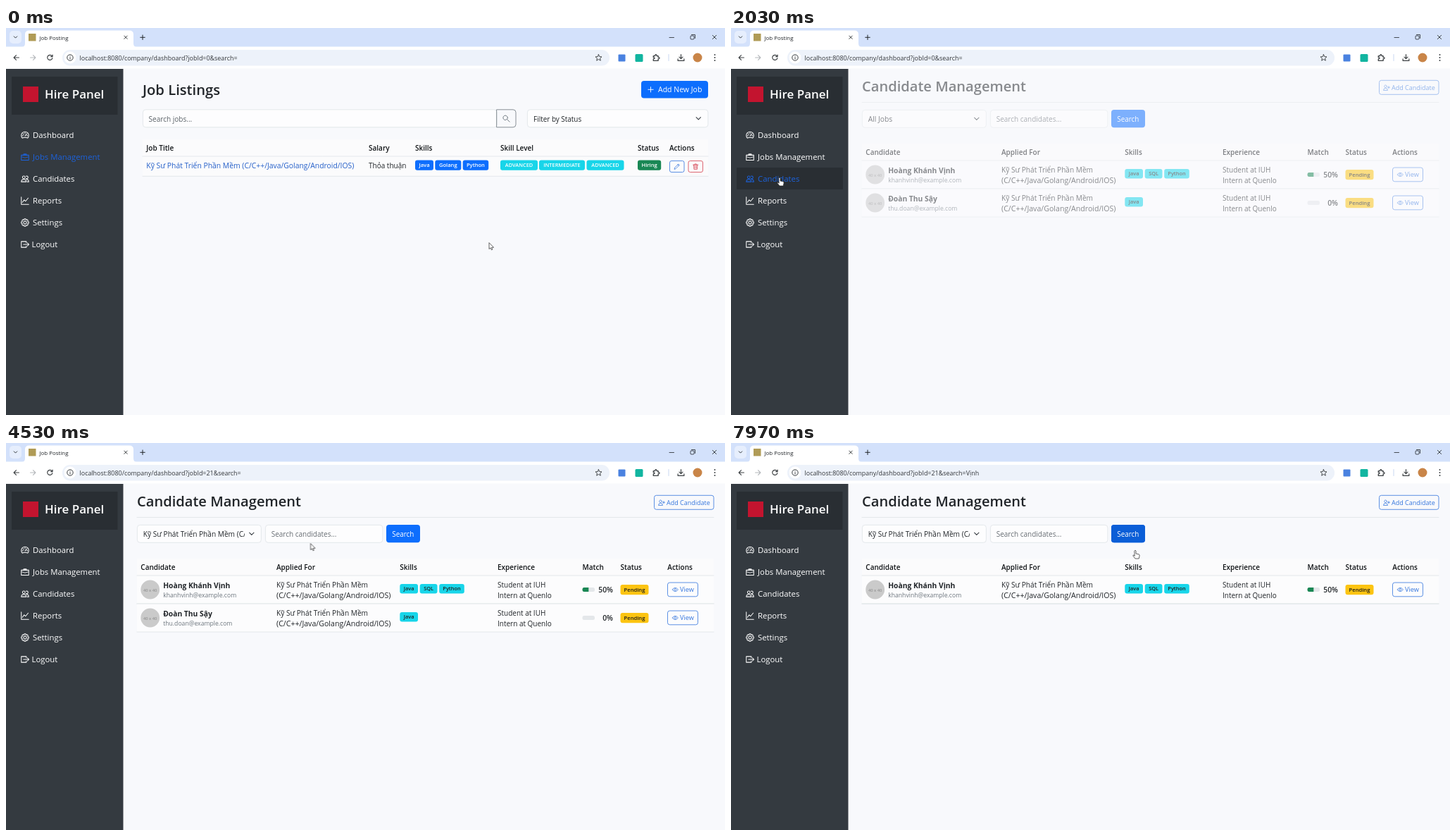
Animation of 1021 by 549 pixels, one loop 8000 ms. Source, as an HTML page:

```html
<!DOCTYPE html>
<html lang="vi">
<head>
<meta charset="utf-8">
<title>Job Posting</title>
<style>
html, body { margin: 0; width: 100%; height: 100%; overflow: hidden; background: #f8f9fc; }
svg { display: block; width: 100vw; height: 100vh; }
text { font-family: "Open Sans", "Noto Sans", sans-serif; white-space: pre; }
#candidatePage { animation: fadeIn 8s linear infinite; }
#cursor { animation: travel 8s ease-in-out infinite; }
@keyframes fadeIn {
  0%, 22.5% { opacity: 0; }
  28%, 100% { opacity: 1; }
}
@keyframes travel {
  0%, 1% { transform: translate(686px, 305px); }
  9.1% { transform: translate(59px, 202px); }
  11.5%, 31% { transform: translate(69px, 212px); }
  38%, 46% { transform: translate(263px, 129.5px); }
  49%, 52.5% { transform: translate(300px, 172px); }
  56.6% { transform: translate(432.5px, 143px); }
  62%, 87% { transform: translate(443.5px, 135.5px); }
  91.5%, 95.5% { transform: translate(565px, 130px); }
  99.6%, 100% { transform: translate(574px, 152px); }
}
</style>
</head>
<body>
<svg id="stage" viewBox="0 0 1021 549" preserveAspectRatio="none"></svg>
<script>
const LOOP = 8000, SWITCH = 1800, FILTER = 4300, TYPE = 5800, BLUR = 7360, RESULT = 7600;
const BLUE = '#0d6efd', DARK = '#212529', SHADE = '#292e33', LINE = '#dee2e6', CYAN = '#18d5e9';
const ACTIVE = '#1c62dc', OUTLINE = '#3475dd', GREEN = '#198754', RED = '#d6404f', GREY = '#6c757d';

// Hard on/off layers: pairs of start and end times in ms.
const rules = [];
function timed(spans, content) {
  const name = 'span' + rules.length;
  const frames = ['0%{opacity:0}'];
  for (let i = 0; i < spans.length; i += 2) {
    frames.push(`${spans[i] / LOOP * 100}%{opacity:1}`, `${spans[i + 1] / LOOP * 100}%{opacity:0}`);
  }
  rules.push(`@keyframes ${name}{${frames.join('')}}.${name}{animation:${name} ${LOOP}ms step-end infinite}`);
  return `<g class="${name}">${content}</g>`;
}

const text = (x, y, value, size = 10, fill = DARK, weight = 400, anchor = 'start') =>
  `<text x="${x}" y="${y}" font-size="${size}" fill="${fill}" font-weight="${weight}" text-anchor="${anchor}">${value}</text>`;
const box = (x, y, w, h, fill, r = 0, stroke = 'none', sw = 0.8) =>
  `<rect x="${x}" y="${y}" width="${w}" height="${h}" rx="${r}" fill="${fill}" stroke="${stroke}" stroke-width="${sw}"/>`;
const circle = (x, y, r, fill, stroke = 'none') =>
  `<circle cx="${x}" cy="${y}" r="${r}" fill="${fill}" stroke="${stroke}"/>`;
const path = (d, stroke, sw = 1, fill = 'none') =>
  `<path d="${d}" fill="${fill}" stroke="${stroke}" stroke-width="${sw}" stroke-linecap="round" stroke-linejoin="round"/>`;
const rule = (x1, x2, y) => path(`M${x1} ${y}H${x2}`, LINE, 0.8);

// Icons live on a 16 unit grid.
const ICONS = {
  gauge: 'M3 13.5A7 7 0 1 1 13 13.5Q8 11 3 13.5M8 9.5L11.5 5.5M8 3.5V5M3 9H4.5M11.5 9H13M4.5 5.5L5.5 6.5',
  case: 'M1 4.5H15V14H1ZM5.5 4.5V2.5H10.5V4.5M1 7.5L8 9.5L15 7.5',
  people: 'M8.2 5A2.5 2.5 0 1 0 8.2 5.1M1 13.5Q1 9 5.7 9T10.4 13.5ZM10 3A2.5 2.5 0 1 1 10 7.4M11 9Q15 9 15 13.5H12.5',
  chart: 'M1 1V15H15M3 11L6.5 6.5L9 9L14 3',
  gear: 'M8 5.2A2.8 2.8 0 1 0 8.1 5.2M6.8 1H9.2L9.8 3L11.8 2.3L13.7 4.2L13 6.2L15 6.8V9.2L13 9.8L13.7 11.8L11.8 13.7L9.8 13L9.2 15H6.8L6.2 13L4.2 13.7L2.3 11.8L3 9.8L1 9.2V6.8L3 6.2L2.3 4.2L4.2 2.3L6.2 3Z',
  exit: 'M10.5 5V2.5H1V13.5H10.5V11M5 8H15.5M12.5 5L15.5 8L12.5 11',
  pencil: 'M2 14L3 10.5L11.5 2L14 4.5L5.5 13ZM10 3.5L12.5 6',
  bin: 'M2 4H14M3.5 4L4.2 14.5H11.8L12.5 4M6 4V2H10V4M6.3 6.5V12M9.7 6.5V12',
  eye: 'M1 8Q8 -1 15 8Q8 17 1 8M8 5.5A2.5 2.5 0 1 0 8.1 5.5',
  addUser: 'M9 5A3 3 0 1 0 9 5.1M1 14Q1 9.5 6 9.5T11 14ZM13.5 5V10M11 7.5H16',
  lens: 'M11 6.5A4.7 4.7 0 1 0 11 6.6M10 10L15 15',
  chevron: 'M2 5L8 11L14 5',
  plus: 'M8 1.5V14.5M1.5 8H14.5',
  cross: 'M3 3L13 13M13 3L3 13',
  back: 'M15 8H2M8 2L2 8L8 14',
  forward: 'M1 8H14M8 2L14 8L8 14',
  reload: 'M13.6 9A6 6 0 1 1 12 3.6L14 5.6M14 1.5V5.6H10',
  star: 'M8 1L10.1 5.8L15.2 6.2L11.3 9.6L12.5 14.7L8 12L3.5 14.7L4.7 9.6L0.8 6.2L5.9 5.8Z',
  puzzle: 'M2 4H6Q5.5 1 7.7 1T9.5 4H13V7.5Q16 7 16 9T13 10.8V15H2V11Q5 10.5 5 9T2 7.5Z',
  download: 'M8 1V10.5M4 6.5L8 10.5L12 6.5M1 11V15H15V11'
};
const icon = (name, cx, cy, size, color, sw = 1.3) =>
  `<g transform="translate(${cx - size / 2} ${cy - size / 2}) scale(${size / 16})">${path(ICONS[name], color, sw)}</g>`;

const badge = (x, y, w, h, label, fill, color, size = 7.6) =>
  box(x, y, w, h, fill, 3) + text(x + w / 2, y + h / 2 + 2.6, label, size, color, 600, 'middle');
const headings = (y, items) => items.map(([x, label]) => text(x, y, label, 10, '#111417', 600)).join('');

function browser() {
  const base = 'localhost:8080/company/dashboard?jobId=';
  const address = (spans, query) => timed(spans, text(104.5, 45.5, base + query, 8.93, '#33363a'));
  return box(0, 0, 1021, 30, '#d3e1fb') + box(5, 4, 17, 18, '#e6eefd', 5) + icon('chevron', 13.5, 13, 6, DARK, 2.4)
    + path('M22 27Q27 27 27 22V9Q27 3.5 33 3.5H175Q181 3.5 181 9V22Q181 27 186 27Z', 'none', 0, '#fff')
    + box(0, 26.5, 1021, 31, '#fff') + box(32, 8, 10.5, 10.5, '#b09b56')
    + text(47.5, 16.5, 'Job Posting', 7.9) + icon('cross', 170, 13.3, 7, DARK, 2) + icon('plus', 194, 13.3, 8, DARK, 2)
    + path('M942 13.5H948.5', DARK, 0.8) + box(972, 11, 5, 5, 'none', 1, DARK)
    + path('M973.5 9.5H978.5V14.5', DARK, 0.8) + icon('cross', 1006, 13, 8.5, DARK, 1.6)
    + icon('back', 14.5, 42, 9, '#3c4043', 2) + icon('forward', 38.5, 42, 9, '#b4b7bb', 2)
    + icon('reload', 62.5, 42, 9.5, '#3c4043', 2)
    + box(80, 31, 777, 22.5, '#edf2fa', 11) + circle(91, 42, 8.5, '#fff')
    + circle(91, 42, 4.2, 'none', '#3c4043') + path('M91 41.7V44M91 39.8V40', '#3c4043', 1)
    + address([0, FILTER], '0&amp;search=') + address([FILTER, RESULT], '21&amp;search=')
    + address([RESULT, LOOP], '21&amp;search=Vịnh')
    + icon('star', 841.5, 42, 10, '#3c4043', 1.5) + box(869.5, 37.5, 10, 10, '#4a82e0', 1)
    + box(893.5, 37, 11, 11, '#12b5a0', 1.5) + icon('puzzle', 923, 42, 10, '#3c4043', 2)
    + path('M941 37.5V46.5', '#c9d8f2', 1) + icon('download', 958.5, 42, 10, '#3c4043', 1.9)
    + circle(982, 42, 6.5, '#c98548')
    + [38, 42, 46].map(y => circle(1006.5, y, 1, '#3c4043')).join('');
}

function sidebar() {
  const item = (name, label, y, color, x = 38) =>
    icon(name, 27, y, 12, color, 1.35) + text(x, y + 4.2, label, 11.35, color);
  const hover = (spans, y) => timed(spans, box(8, y, 151, 31, SHADE, 1));
  const jobs = color => item('case', 'Jobs Management', 183, color);
  const people = color => item('people', 'Candidates', 214, color);
  return box(0, 58, 166.5, 491, '#343a40') + box(8, 69, 150.5, 54, SHADE) + box(24, 83, 22, 22, '#c3142f')
    + text(55, 100.3, 'Hire Panel', 17, '#fff', 600)
    + hover([640, 830], 167) + hover([830, 2640], 198)
    + item('gauge', 'Dashboard', 152, '#fff')
    + timed([0, SWITCH], jobs(ACTIVE)) + timed([SWITCH, LOOP], jobs('#fff'))
    + timed([0, SWITCH, FILTER, LOOP], people('#fff')) + timed([SWITCH, FILTER], people(ACTIVE))
    + item('chart', 'Reports', 245, '#fff') + item('gear', 'Settings', 276, '#fff')
    + item('exit', 'Logout', 307, '#fff', 36.5);
}

const ROLE = 'Kỹ Sư Phát Triển Phần Mềm';
const STACK = '(C/C++/Java/Golang/Android/IOS)';

function jobPage() {
  const skills = [[581, 26, 'Java'], [609.3, 37, 'Golang'], [648.7, 36.5, 'Python']];
  const levels = [[702, 53, 'ADVANCED'], [757, 65, 'INTERMEDIATE'], [824.5, 53, 'ADVANCED']];
  return text(194, 95.3, 'Job Listings', 20.2, DARK, 600)
    + box(902, 75, 95, 24.5, BLUE, 4) + icon('plus', 915.5, 87.3, 9, '#fff', 1.6)
    + text(926, 91.2, 'Add New Job', 10.5, '#fff')
    + box(194.4, 115.8, 503, 25, '#fdfdfe', 4, LINE) + text(202.5, 132.6, 'Search jobs...', 10.05, '#5c6369')
    + path('M697 115.8H720Q724 115.8 724 119.8V136.8Q724 140.8 720 140.8H697Z', GREY, 0.8)
    + icon('lens', 710.3, 128.3, 11, GREY, 1.4)
    + box(740.4, 115.8, 256.5, 25, '#fdfdfe', 4, LINE) + text(749, 132.6, 'Filter by Status', 9.95)
    + icon('chevron', 983.3, 128.3, 8.5, '#343a40', 2)
    + box(194, 158, 803, 52, '#fbfbfc')
    + headings(173.8, [[199.3, 'Job Title'], [515, 'Salary'], [581, 'Skills'], [702, 'Skill Level'], [897, 'Status'], [942, 'Actions']])
    + rule(194, 997, 182) + rule(194, 997, 210.3)
    + text(199.3, 199.4, ROLE + ' ' + STACK, 10.36, '#245fc9') + text(515, 199.4, 'Thỏa thuận', 10)
    + skills.map(([x, w, label]) => badge(x, 187.5, w, 14.3, label, BLUE, '#fff')).join('')
    + levels.map(([x, w, label]) => badge(x, 187.5, w, 14.3, label, CYAN, '#fff', 7.4)).join('')
    + badge(897, 187.5, 33.2, 14.3, 'Hiring', GREEN, '#fff')
    + box(942.5, 188.5, 20.5, 16, 'none', 2.5, OUTLINE) + icon('pencil', 952.7, 196.5, 9.5, OUTLINE)
    + box(969, 188.5, 20.5, 16, 'none', 2.5, RED) + icon('bin', 979.2, 196.5, 9.5, RED);
}

function candidateRow(y, name, mail, skills, match) {
  return box(186, y, 819, 40, '#fcfcfd') + rule(186, 1005, y + 40)
    + circle(204.7, y + 20, 13.4, '#cacaca') + text(204.7, y + 22.6, '40 x 40', 5.8, '#969696', 600, 'middle')
    + text(223.2, y + 18.2, name, 10.3, DARK, 700) + text(223.2, y + 31, mail, 8.65, GREY)
    + text(384, y + 17.4, ROLE, 10.1) + text(384, y + 31.6, STACK, 10.6)
    + skills.map(([x, w, label]) => badge(x, y + 12, w, 13.6, label, CYAN, '#222', 7.4)).join('')
    + text(698, y + 17.4, 'Student at IUH', 10) + text(698, y + 31.6, 'Intern at Quenlo', 10)
    + box(818.5, y + 17, 17.5, 6, '#e4e7ea', 2.5)
    + (match ? path(`M827.3 ${y + 17}V${y + 23}H821Q818.5 ${y + 23} 818.5 ${y + 20}T821 ${y + 17}Z`, 'none', 0, GREEN) : '')
    + text(862, y + 24.4, match + '%', 10.3, DARK, 600, 'end')
    + badge(872.5, y + 13, 40, 14.3, 'Pending', '#fcc412', '#1b1b1b')
    + box(939.5, y + 10, 43, 19.8, 'none', 3, OUTLINE) + icon('eye', 950.3, y + 20, 9.5, OUTLINE)
    + text(957, y + 23.4, 'View', 9.2, OUTLINE);
}

function candidatePage() {
  const typed = ['V', 'Vi', 'Vịn', 'Vịnh'].map((word, i) => {
    const start = TYPE + i * 200;
    return timed([start, i < 3 ? start + 200 : RESULT], text(376.7, 133, word, 10));
  }).join('');
  const searchButton = fill => box(540, 116, 48, 25.3, fill, 4);
  const java = [559.3, 25.7, 'Java'];
  return text(186, 90, 'Candidate Management', 20.1, DARK, 600)
    + box(920.5, 74.3, 84.5, 20, 'none', 3, OUTLINE) + icon('addUser', 930.7, 84.5, 9.5, OUTLINE)
    + text(938, 87.9, 'Add Candidate', 9, OUTLINE) + rule(186, 1005, 105.5)
    + box(186.4, 116.3, 176, 25, '#fdfdfe', 4, LINE) + icon('chevron', 348.8, 128.8, 8.5, '#343a40', 2)
    + timed([0, FILTER], text(194.7, 133, 'All Jobs', 10.3))
    + timed([FILTER, LOOP], `<g clip-path="url(#selectText)">${text(194.7, 133, ROLE + ' ' + STACK, 10.15)}</g>`)
    + box(368.4, 116.3, 166.5, 25, '#fdfdfe', 4, LINE)
    + timed([5300, BLUR], box(367.4, 115.3, 168.5, 27, 'none', 5, '#bcd6fd', 2.4) + box(368.4, 116.3, 166.5, 25, '#fff', 4, '#6ba4f8', 1))
    + timed([0, TYPE, RESULT, LOOP], text(376.7, 133, 'Search candidates...', 10, '#686e74')) + typed
    + searchButton(BLUE) + timed([7180, LOOP], searchButton('#0b5ed7')) + text(548.3, 133, 'Search', 9.9, '#fff')
    + box(186, 164, 819, 24, '#fbfbfc')
    + headings(179.8, [[191.3, 'Candidate'], [384, 'Applied For'], [559.3, 'Skills'], [698, 'Experience'], [818.5, 'Match'], [872.5, 'Status'], [939.3, 'Actions']])
    + candidateRow(188, 'Hoàng Khánh Vịnh', 'khanhvinh@example.com', [java, [587.7, 24.8, 'SQL'], [615.2, 35.6, 'Python']], 50)
    + timed([0, RESULT], candidateRow(228, 'Đoàn Thu Sậy', 'thu.doan@example.com', [java], 0))
    + rule(186, 1005, 188) + rule(186, 1005, 228);
}

function cursor() {
  const arrow = path('M0 0V8.6L2 6.8L3.4 9.8L4.8 9.2L3.5 6.3H6.2Z', '#222', 0.7, '#fff');
  const hand = path('M-1 1Q0 -1 1 1V5L5 5.8Q6.4 6.2 6.1 8L5.2 12H0L-3 8.2Q-3.4 6.8 -2.2 7L-1 8Z', '#222', 0.7, '#fff');
  const beam = path('M-2 -4.5H-0.6L0 -4L0.6 -4.5H2M0 -4V4M-2 4.5H-0.6L0 4L0.6 4.5H2', '#222', 0.9);
  return timed([0, 620, 2640, 4680], arrow) + timed([620, 2640, 7150, LOOP], hand) + timed([4680, 7150], beam);
}

document.getElementById('stage').innerHTML =
  '<clipPath id="selectText"><rect x="190" y="116" width="148.5" height="26"/></clipPath>'
  + box(0, 0, 1021, 549, '#f8f9fc') + browser() + sidebar()
  + timed([0, SWITCH], jobPage()) + `<g id="candidatePage">${candidatePage()}</g>`
  + `<g id="cursor">${cursor()}</g>`;
const sheet = document.createElement('style');
sheet.textContent = rules.join('\n');
document.head.append(sheet);
</script>
</body>
</html>
```
